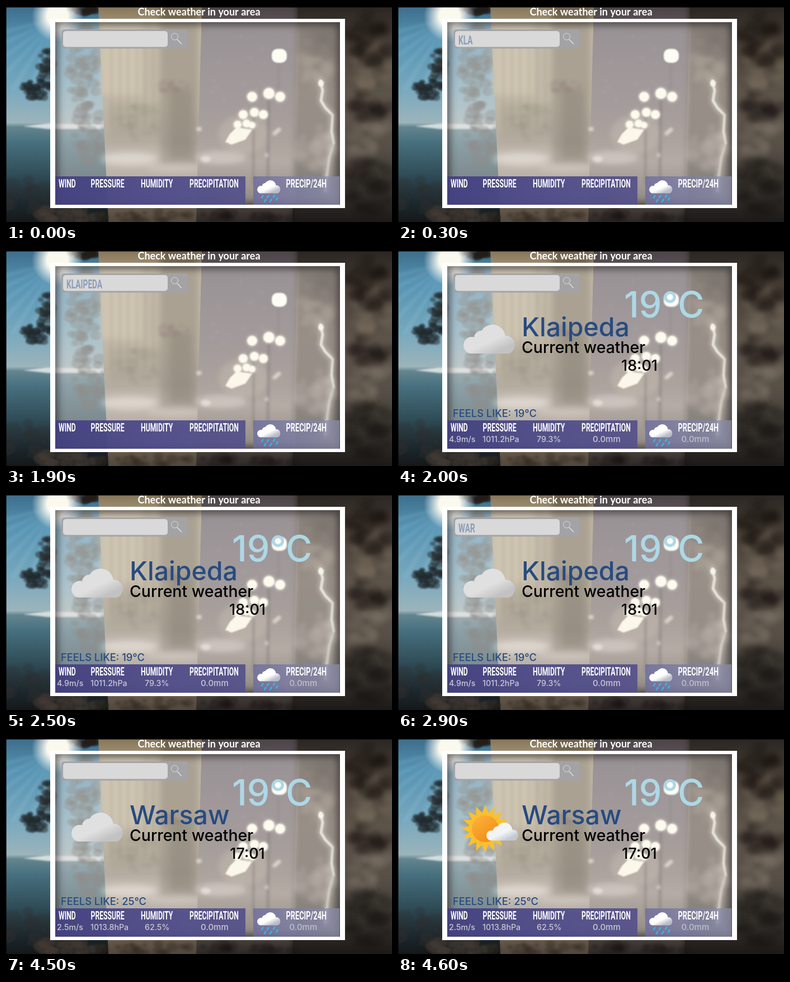
Write an HTML page with a canvas that moves like this. It is 690 px wide and 388 px high and loops after 5.1 s.

```html
<!DOCTYPE html>
<html lang="en">
<head>
<meta charset="utf-8">
<title>Weather search</title>
<style>
html, body { margin: 0; width: 100%; height: 100%; overflow: hidden; background: #000; }
canvas { display: block; }
</style>
</head>
<body>
<canvas id="stage" width="690" height="388"></canvas>
<script>
const W = 690, H = 388, LOOP = 5100, TAU = Math.PI * 2;
const stage = document.getElementById('stage').getContext('2d');
const backdrop = document.createElement('canvas');
backdrop.width = W;
backdrop.height = H;
let c = backdrop.getContext('2d');

let seed = 11;
const rnd = () => (seed = (seed * 16807) % 2147483647) / 2147483647;

function rect(x, y, w, h, fill, r = 0) {
  c.fillStyle = fill;
  c.beginPath();
  c.roundRect(x, y, w, h, r);
  c.fill();
}

function oval(x, y, rx, ry, fill) {
  c.fillStyle = fill;
  c.beginPath();
  c.ellipse(x, y, rx, ry, 0, 0, TAU);
  c.fill();
}

function line(points, color, width) {
  c.strokeStyle = color;
  c.lineWidth = width;
  c.lineCap = c.lineJoin = 'round';
  c.beginPath();
  points.forEach(([x, y]) => c.lineTo(x, y));
  c.stroke();
}

function shape(points, fill) {
  c.fillStyle = fill;
  c.beginPath();
  points.forEach(([x, y]) => c.lineTo(x, y));
  c.fill();
}

// Colours spread over a linear gradient at the given stops
function ramp(x0, y0, x1, y1, stops) {
  const g = c.createLinearGradient(x0, y0, x1, y1);
  stops.forEach(([at, color]) => g.addColorStop(at, color));
  return g;
}

function glow(x, y, r, color, core) {
  const g = c.createRadialGradient(x, y, 0, x, y, r);
  g.addColorStop(0, color);
  g.addColorStop(core, color);
  g.addColorStop(1, 'rgba(255,255,255,0)');
  oval(x, y, r, r, g);
}

function blurred(px, paint) {
  c.save();
  c.filter = `blur(${px}px)`;
  paint();
  c.restore();
}

// A loose cluster of leaves or smoke inside an ellipse
function cluster(n, x, y, rx, ry, size, color) {
  for (let i = 0; i < n; i++) {
    const a = rnd() * TAU, d = Math.sqrt(rnd()), s = size * (0.5 + rnd());
    oval(x + Math.cos(a) * d * rx, y + Math.sin(a) * d * ry, s * 1.3, s, color);
  }
}

function paintSea() {
  shape([[0, 0], [190, 0], [190, H], [0, H]], ramp(0, 0, 0, H, [
    [0, '#3d6d8a'], [0.15, '#5592b2'], [0.38, '#77a8be'], [0.54, '#9cb4bb'],
    [0.56, '#64858f'], [0.63, '#47707e'], [0.78, '#304d58'], [0.9, '#1d2a30'], [1, '#15181a']]));
  blurred(3, () => {
    for (let i = 0; i < 7; i++) {
      const a = 1.75 + i * 0.19;
      line([[92, 22], [92 + Math.cos(a) * 150, 22 + Math.sin(a) * 150]], 'rgba(180,222,238,.25)', 4);
    }
  });
  blurred(1.5, () => {
    shape([[30, 216], [75, 211], [185, 213], [185, 221], [75, 221]], 'rgba(232,236,234,.85)');
    cluster(14, 135, 6, 28, 7, 6, 'rgba(35,28,24,.6)');
    cluster(45, 54, 148, 26, 20, 5, 'rgba(32,40,44,.5)');
    cluster(24, 72, 105, 12, 26, 5, 'rgba(36,40,40,.5)');
    cluster(45, 140, 110, 30, 75, 7, 'rgba(88,86,80,.38)');
    cluster(35, 150, 230, 28, 55, 7, 'rgba(80,78,74,.35)');
    cluster(30, 115, 375, 60, 14, 8, 'rgba(66,58,52,.45)');
    cluster(16, 40, 345, 45, 35, 9, 'rgba(48,48,46,.3)');
  });
  glow(92, 18, 46, 'rgba(255,252,240,.98)', 0.4);
}

function paintCity() {
  shape([[165, 0], [350, 0], [346, H], [183, H]], ramp(0, 0, 0, H, [
    [0, '#857357'], [0.1, '#a89c80'], [0.45, '#a3987f'], [0.63, '#8f8574'],
    [0.7, '#aca497'], [0.8, '#938a7e'], [0.92, '#6b5e50'], [1, '#52473b']]));
  blurred(6, () => {
    rect(168, 30, 75, 130, 'rgba(215,205,170,.4)');
    rect(276, 0, 68, 285, 'rgba(62,54,38,.4)');
    rect(293, 150, 40, 125, 'rgba(62,58,38,.4)');
    rect(185, 175, 95, 60, 'rgba(88,85,60,.25)');
    oval(220, 275, 50, 12, 'rgba(240,236,226,.55)');
    oval(300, 290, 50, 8, 'rgba(225,220,210,.35)');
  });
  blurred(2, () => {
    for (let i = 0; i < 6; i++) rect(186 + i * 15, 50, 5, 165, 'rgba(90,82,60,.15)');
    cluster(25, 300, 145, 26, 12, 4, 'rgba(92,66,58,.25)');
    cluster(30, 235, 210, 50, 35, 5, 'rgba(80,76,55,.13)');
    cluster(20, 250, 378, 80, 9, 6, 'rgba(40,33,27,.35)');
  });
}

function paintLamps() {
  shape([[350, 0], [522, 0], [512, H], [340, H]], ramp(0, 0, 0, H, [
    [0, '#4b4344'], [0.12, '#605962'], [0.45, '#71686b'], [0.62, '#7d746d'],
    [0.72, '#8d837b'], [0.85, '#665d56'], [1, '#2d2826']]));
  blurred(5, () => {
    oval(385, 272, 45, 12, 'rgba(220,214,205,.5)');
    oval(425, 230, 45, 35, 'rgba(190,178,160,.35)');
  });
  blurred(2, () => {
    line([[470, 165], [468, 320]], 'rgba(50,44,42,.45)', 5);
    line([[443, 200], [442, 320]], 'rgba(50,44,42,.45)', 4);
    line([[487, 100], [487, 160]], 'rgba(60,54,54,.3)', 3);
    cluster(35, 430, 130, 75, 95, 3, 'rgba(150,140,142,.16)');
    cluster(20, 430, 378, 90, 9, 7, 'rgba(25,21,19,.35)');
  });
}

function paintStorm() {
  blurred(5, () => shape([[520, -20], [W + 20, -20], [W + 20, H + 20], [512, H + 20]], ramp(0, 0, 0, H, [
    [0, '#2a2521'], [0.15, '#453d35'], [0.4, '#5c5349'], [0.65, '#575047'], [0.85, '#38332e'], [1, '#1c1917']])));
  blurred(4, () => {
    cluster(26, 655, 110, 40, 55, 9, 'rgba(128,115,98,.25)');
    cluster(22, 648, 235, 38, 38, 9, 'rgba(130,121,108,.26)');
    cluster(26, 650, 60, 42, 50, 9, 'rgba(22,18,14,.3)');
    cluster(20, 655, 180, 36, 25, 8, 'rgba(22,18,15,.3)');
    cluster(26, 650, 325, 50, 50, 10, 'rgba(16,14,12,.28)');
    cluster(24, 550, 100, 30, 50, 9, 'rgba(140,128,110,.25)');
    cluster(24, 555, 255, 35, 40, 9, 'rgba(165,156,144,.28)');
    cluster(16, 565, 60, 30, 30, 9, 'rgba(40,34,28,.3)');
  });
}

function paintLights() {
  const bolt = [[562, 134], [566, 152], [563, 170], [571, 183], [584, 196], [582, 225],
    [586, 246], [578, 272], [574, 300], [571, 332]];
  blurred(4, () => line(bolt, 'rgba(240,235,225,.45)', 10));
  blurred(1.2, () => {
    line(bolt.slice(0, 7), 'rgba(248,244,236,.8)', 4.5);
    line(bolt.slice(6), 'rgba(235,230,222,.45)', 5);
    oval(563, 139, 5, 6, '#f6f3ea');
  });
  const lamps = [[440, 163, 9], [470, 157, 10], [490, 163, 9], [424, 195, 8], [444, 191, 8],
    [460, 195, 8], [414, 213, 7], [430, 211, 7], [440, 214, 6]];
  blurred(2, () => {
    lamps.forEach(([x, y, r]) => oval(x, y, r + 2, r + 2, 'rgba(255,250,235,.35)'));
    line([[488, 222], [480, 229]], 'rgba(250,245,235,.6)', 7);
    oval(345, 221, 5, 4, 'rgba(250,245,235,.6)');
    oval(357, 275, 9, 6, 'rgba(250,245,235,.5)');
    oval(466, 268, 4, 4, 'rgba(250,245,235,.4)');
  });
  blurred(0.8, () => {
    lamps.forEach(([x, y, r]) => oval(x, y, r, r, '#fdfaee'));
    rect(475, 77, 27, 25, '#fdfcf5', 10);
    shape([[412, 218], [440, 222], [428, 240], [403, 249], [392, 244], [400, 230]], '#fbf7ea');
  });
}

function paintBackdrop() {
  paintSea();
  paintCity();
  paintLamps();
  paintStorm();
  rect(0, 0, W, 2.5, '#000');
  rect(0, 0, 1, H, 'rgba(0,0,0,.7)');

  // Glass panel with an inner shadow
  c.save();
  c.beginPath();
  c.rect(88, 29, 509, 329);
  c.clip();
  rect(88, 29, 509, 329, 'rgba(233,227,222,.42)');
  paintLights();
  blurred(7, () => {
    c.strokeStyle = 'rgba(25,22,24,.7)';
    c.lineWidth = 12;
    c.strokeRect(86, 27, 513, 333);
  });
  c.restore();
  rect(88, 306, 340, 51, ramp(88, 306, 428, 357, [
    [0, 'rgba(66,63,128,.93)'], [0.6, 'rgba(78,75,138,.93)'], [1, 'rgba(86,82,138,.93)']]));
  rect(442, 306, 154, 51, ramp(442, 0, 596, 0, [
    [0, 'rgba(108,108,158,.8)'], [1, 'rgba(140,142,172,.72)']]));
  c.fillStyle = '#fff';
  c.beginPath();
  c.rect(79, 23, 527, 340);
  c.rect(88, 29, 509, 328);
  c.fill('evenodd');

  // Search field
  rect(99, 42, 227, 34.5, 'rgba(163,163,166,.93)', 5);
  rect(102, 45, 187, 28.5, '#d9d9d9', 5);
  c.strokeStyle = '#dedede';
  c.lineWidth = 1;
  c.beginPath();
  c.arc(301.5, 55, 6, 0, TAU);
  c.stroke();
  line([[306, 60], [313.5, 68]], '#dedede', 1.5);

  text('Check weather in your area', 345, 17, '700 18px Lato, sans-serif', '#fff', 'center');
  narrow('WIND', 94, 325.5, 20, '#fff');
  narrow('PRESSURE', 151.5, 325.5, 20, '#fff');
  narrow('HUMIDITY', 241, 325.5, 20, '#fff');
  narrow('PRECIPITATION', 328, 325.5, 20, '#fff');
  narrow('PRECIP/24H', 500.5, 325.5, 21, '#fff');
  cloud(449, 313, 0.45, '#ffffff', '#b9bcc6');
  [[458, 343], [468, 343], [479, 342], [463, 350], [473, 350], [484, 347]].forEach(([x, y]) =>
    line([[x + 1.5, y - 2.5], [x - 1, y + 1.5]], '#35b4e6', 2.6));
}

function text(s, x, y, font, color, align = 'left') {
  c.font = font;
  c.fillStyle = color;
  c.textAlign = align;
  c.fillText(s, x, y);
}

const sans = (s, x, y, size, color, align) => text(s, x, y, `500 ${size}px Inter, sans-serif`, color, align);

// Condensed capitals
function narrow(s, x, y, size, color) {
  c.save();
  c.translate(x, y);
  c.scale(0.61, 1);
  text(s, 0, 0, `700 ${size}px Roboto, sans-serif`, color);
  c.restore();
}

function cloud(x, y, s, light, dark) {
  c.save();
  c.translate(x, y);
  c.scale(s, s);
  c.fillStyle = ramp(30, 0, 55, 52, [[0, light], [0.6, light], [1, dark]]);
  c.beginPath();
  [[15, 37, 15], [32, 24, 13], [52, 23, 23], [76, 36, 16]].forEach(([cx, cy, r]) => {
    c.moveTo(cx + r, cy);
    c.arc(cx, cy, r, 0, TAU);
  });
  c.roundRect(2, 30, 88, 22, 11);
  c.fill();
  c.restore();
}

function sunny() {
  c.fillStyle = '#fbc02d';
  c.beginPath();
  for (let i = 0; i < 32; i++) {
    const a = i * TAU / 32 - TAU / 4, r = i % 2 ? 29 : 43;
    c.lineTo(156 + Math.cos(a) * r, 163 + Math.sin(a) * r);
  }
  c.fill();
  oval(156, 163, 24, 24, ramp(140, 142, 170, 186, [[0, '#fbb03a'], [1, '#f18a14']]));
  cloud(158, 152, 0.62, '#f3f4f6', '#c3c8d2');
}

const klaipeda = { name: 'Klaipeda', time: '18:01', feels: 19, wind: '4.9', pressure: '1011.2', humidity: '79.3' };
const warsaw = { name: 'Warsaw', time: '17:01', feels: 25, wind: '2.5', pressure: '1013.8', humidity: '62.5' };

function report(w) {
  const navy = '#264b80', pale = '#c9c9d2';
  sans('19°C', 404, 121, 64.5, '#add8e6');
  sans(w.name, 221, 154.5, 46.5, navy);
  sans('Current weather', 221, 185, 28.4, '#000');
  sans(w.time, 431.5, 217, 27, '#000', 'center');
  sans(`FEELS LIKE: ${w.feels}°C`, 98, 299.5, 18.3, navy);
  sans(w.wind + 'm/s', 91, 345, 14.2, pale);
  sans(w.pressure + 'hPa', 151, 345, 14.2, pale);
  sans(w.humidity + '%', 248, 345, 14.2, pale);
  sans('0.0mm', 348, 345, 15, pale);
  sans('0.0mm', 506.5, 345, 15, '#bfc0cb');
}

function frame() {
  const t = performance.now() % LOOP, tick = Math.floor(t / 100);
  let typed = '';
  c.drawImage(backdrop, 0, 0);
  if (t < 2000) typed = 'KLAIPEDA'.slice(0, tick);
  else if (t < 4500) typed = 'WARSAW'.slice(0, Math.max(0, tick - 26));
  narrow(typed, 108, 68.5, 22.5, '#8b9db8');
  if (t >= 2000) {
    report(t < 4500 ? klaipeda : warsaw);
    if (t < 4600) cloud(117, 134, 1, '#e0e0e0', '#c2c2c2');
    else sunny();
  }
  requestAnimationFrame(frame);
}

paintBackdrop();
c = stage;
frame();
</script>
</body>
</html>
```
